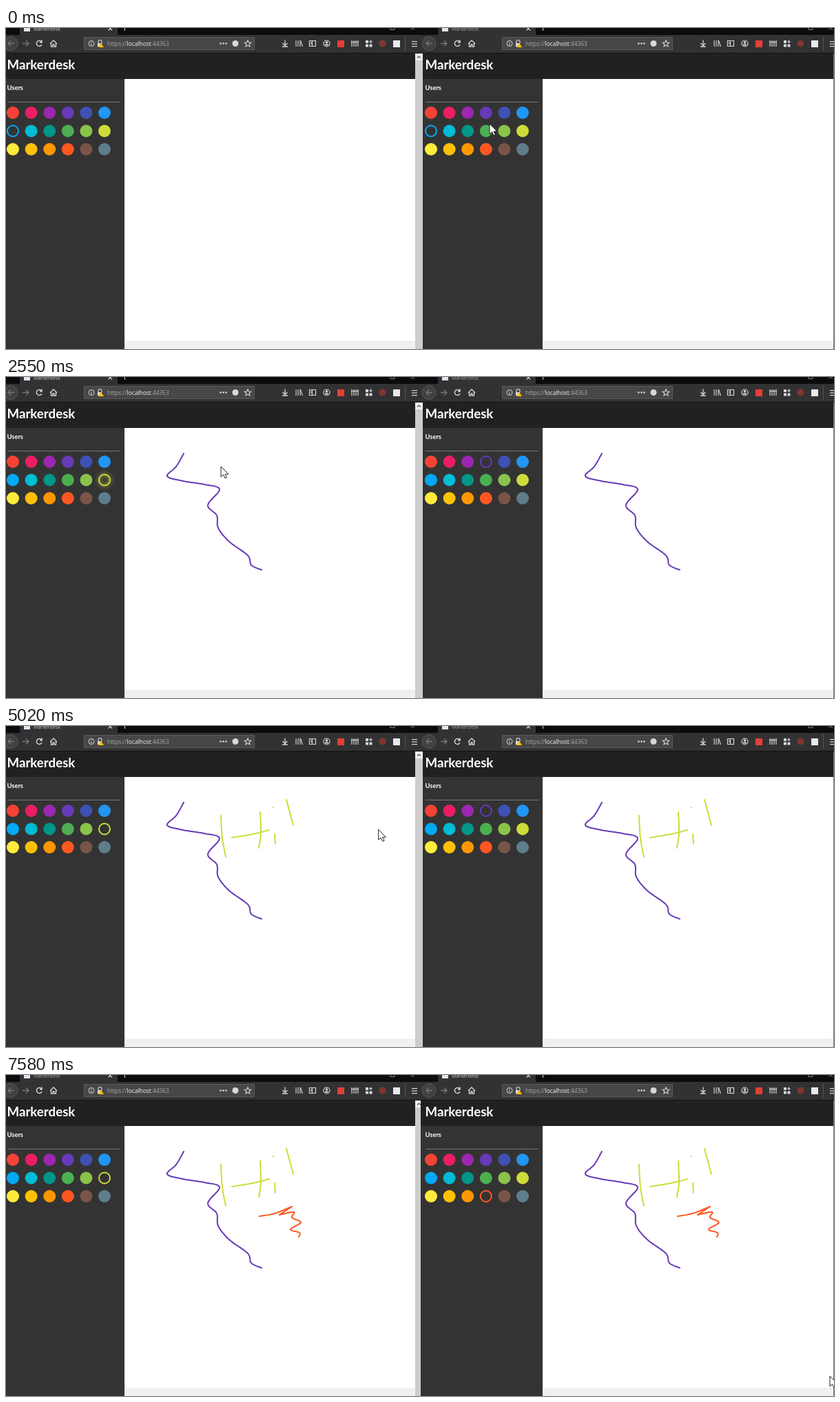
Recreate the animation shown at these times as an HTML page with a canvas. Size 1202x466 px, loop 7.65 s.

```html
<!DOCTYPE html>
<html lang="en">
<head>
<meta charset="utf-8">
<title>Shared drawing</title>
<style>
html, body { margin: 0; width: 100%; height: 100%; overflow: hidden; background: #333; }
canvas { display: block; }
</style>
</head>
<body>
<canvas id="stage" width="1202" height="466"></canvas>
<script>
const g = document.getElementById('stage').getContext('2d');
const LOOP = 7650, STEP = LOOP / 99, SHIFT = 607, TAU = Math.PI * 2;
const NAME = 'Markerdesk';
const UI = '"Open Sans", "Noto Sans", sans-serif', LATO = 'Lato, sans-serif';
const INK = '#d8d8da', DIM = '#78787b', BAR = '#323234';
const SWATCHES = ('f44336 e91e63 9c27b0 673ab7 3f51b5 2196f3 03a9f4 00bcd4 009688 ' +
  '4caf50 8bc34a cddc39 ffeb3b ffc107 ff9800 ff5722 795548 607d8b').split(' ').map(c => '#' + c);
const PURPLE = 3, SKY = 6, LIME = 11, ORANGE = 15;

const clamp = v => Math.max(0, Math.min(1, v));
const mix = (a, b, k) => a + (b - a) * k;
const during = (t, a, b) => t >= a && t < b;

// Catmull-Rom curve through the given points.
function smooth(pts) {
  const at = i => pts[Math.max(0, Math.min(pts.length - 1, i))];
  const out = [pts[0]];
  for (let i = 0; i < pts.length - 1; i++) {
    for (let n = 1; n <= 8; n++) {
      const k = n / 8;
      out.push([0, 1].map(c => {
        const [a, b, d, e] = [-1, 0, 1, 2].map(j => at(i + j)[c]);
        return b + k / 2 * (d - a + k * (2 * a - 5 * b + 4 * d - e + k * (3 * (b - d) + e - a)));
      }));
    }
  }
  return out;
}

// Part of a polyline up to a share of its length.
function trim(pts, share) {
  const lens = pts.slice(1).map((p, i) => Math.hypot(p[0] - pts[i][0], p[1] - pts[i][1]));
  let left = share * lens.reduce((a, b) => a + b, 0);
  const out = [pts[0]];
  for (let i = 0; i < lens.length && left > 0; i++) {
    const k = Math.min(1, left / lens[i]);
    out.push([mix(pts[i][0], pts[i + 1][0], k), mix(pts[i][1], pts[i + 1][1], k)]);
    left -= lens[i];
  }
  return out;
}

// Pointer stops: time, x, y. Stroke ends are added by pen().
const stops = [
  [0, 702, 139], [155, 699, 125], [320, 699, 125], [600, 865, 111], [1560, 978, 280],
  [2220, 143, 151], [2410, 143, 151], [3170, 367, 177], [3900, 382, 151], [5022, 593, 153],
  [5330, 697, 180], [5570, 697, 180], [6180, 966, 168], [7573, 1196, 437], [LOOP, 1196, 437]
];
const strokes = [];

function pen(ink, from, to, ...pts) {
  const side = ink === LIME ? 0 : 1;
  const stop = (t, [x, y]) => stops.push([t, x + side * SHIFT, y]);
  if (!strokes.some(s => s.to === from)) stop(from - 28, pts[0]);
  stop(from, pts[0]);
  stop(to, pts[pts.length - 1]);
  strokes.push({ ink, side, from, to, pts: smooth(pts) });
}

pen(PURPLE, 690, 1390, [258, 111], [247, 130], [234, 144], [257, 151], [288, 156], [310, 163],
  [293, 186], [306, 201], [308, 219], [324, 239], [351, 259], [356, 273], [371, 280]);
pen(LIME, 2570, 2740, [312, 130], [314, 163], [319, 190]);
pen(LIME, 2870, 3060, [369, 125], [370, 155], [367, 177]);
pen(LIME, 3430, 3800, [328, 162], [358, 157], [382, 151]);
pen(LIME, 4020, 4150, [390, 157], [391, 171]);
pen(LIME, 4320, 4400, [388, 118], [388, 118.5]);
pen(LIME, 4630, 4810, [407, 107], [417, 144]);
pen(ORANGE, 6290, 6430, [368, 205], [390, 201], [415, 191]);
pen(ORANGE, 6430, 6491, [415, 191], [397, 203]);
pen(ORANGE, 6491, 7090, [397, 203], [418, 199], [415, 207], [428, 214], [413, 224], [426, 229], [425, 235]);
stops.sort((a, b) => a[0] - b[0]);

const clicks = [[230, 305], [2290, 2390], [5480, 5555]];

function pointer(t) {
  const s = strokes.find(s => during(t, s.from, s.to));
  if (s) {
    const [x, y] = trim(s.pts, (t - s.from) / (s.to - s.from)).pop();
    return { x: x + s.side * SHIFT, y, down: true };
  }
  let i = 0;
  while (i < stops.length - 2 && stops[i + 1][0] <= t) i++;
  const [a, b] = [stops[i], stops[i + 1]];
  let k = clamp((t - a[0]) / (b[0] - a[0]));
  k = k * k * (3 - 2 * k);
  return { x: mix(a[1], b[1], k), y: mix(a[2], b[2], k), down: clicks.some(c => during(t, ...c)) };
}

function box(x, y, w, h, color) { g.fillStyle = color; g.fillRect(x, y, w, h); }
function dot(x, y, r, color) { g.fillStyle = color; g.beginPath(); g.arc(x, y, r, 0, TAU); g.fill(); }
function ring(x, y, r, color, w = 1.2) {
  g.strokeStyle = color; g.lineWidth = w;
  g.beginPath(); g.arc(x, y, r, 0, TAU); g.stroke();
}
function path(d, color, w = 1.3) {
  g.strokeStyle = color; g.lineWidth = w; g.stroke(new Path2D(d));
}
function text(s, x, y, font, color) {
  g.font = font; g.fillStyle = color; g.fillText(s, x, y);
  return x + g.measureText(s).width;
}

function tabs(active) {
  box(0, 0, 607, 11, '#0c0c0d');
  box(20, 0, 142, 11, BAR);
  box(0, 10, 607, 26, BAR);
  box(0, 36, 607, 1, '#121213');
  box(26, 0, 9, 5, '#dce8ee');
  text(NAME, 40, 3.6, '7.1px ' + UI, active ? '#c9c9cb' : '#a2a2a4');
  path('M148.5 -2l5.5 5.5m0 -5.5l-5.5 5.5', INK, 1.2);
  box(172, 0, 1, 4, INK);
  path('M558 -3v5.5h6v-5.5M587.5 -3l5.5 6m0 -6l-5.5 6', '#858587', 1);
}

function navigation() {
  dot(7, 22.5, 10, '#414143');
  ring(7, 22.5, 10, '#59595b', 1);
  path('M12 22.5h-9m4 -4l-4 4l4 4', DIM);
  path('M24 22.5h9m-4 -4l4 4l-4 4', DIM);
  path('M51.5 20a4 4 0 1 0 .5 4m0 -6.5v3.5h-3', INK, 1.4);
  path('M64 23l5 -5l5 5m-8.500 -1v5h2.500v-3h2v3h2.500v-5', INK);
}

function address() {
  box(113, 13, 248, 19, '#5a5a5c');
  box(114, 14, 246, 17, '#474749');
  ring(124, 22.5, 4, INK, 1);
  box(123.5, 22, 1, 3, INK);
  box(123.5, 20, 1, 1, INK);
  path('M134 22v-2a2.5 2.5 0 0 1 5 0v2', INK, 1.1);
  box(133, 22, 6, 5, INK);
  g.fillStyle = '#ffbf00';
  g.fill(new Path2D('M138 21.5l4 6.5h-8z'));
  const font = '8.4px ' + UI;
  let x = text('https://', 147, 26, font, '#a9a9ab');
  x = text('localhost', x, 26, font, '#f4f4f5');
  text(':44363', x, 26, font, '#a9a9ab');
  for (let i = 0; i < 3; i++) dot(311.5 + i * 4, 22.5, 1.35, INK);
  dot(333, 22.5, 4.5, INK);
  g.strokeStyle = INK;
  g.lineWidth = 1.1;
  g.beginPath();
  for (let i = 0; i < 10; i++) {
    const r = i % 2 ? 2.3 : 5, a = i * TAU / 10;
    g.lineTo(351 + r * Math.sin(a), 22.8 - r * Math.cos(a));
  }
  g.closePath();
  g.stroke();
}

function extras() {
  path('M405 17.5v7.5m-3.5 -3l3.5 3.5l3.5 -3.5m-7.5 5h8', INK);
  for (let i = 0; i < 3; i++) box(420.5 + i * 3, 18, 1.1, 9, INK);
  path('M427.5 18l3 9', INK, 1.1);
  path('M440.5 18.5h9v8h-9zm4 0v8m-2.5 -5.5h2m-2 2h2', INK, 1.2);
  ring(465.5, 22.5, 4.5, INK);
  dot(465.5, 21, 1.8, INK);
  box(463, 23.5, 5, 2, INK);
  box(481, 18, 10, 10, '#e53e35');
  for (let i = 0; i < 4; i++) box(501.4 + i * 3, 18, 1.2, 9, INK);
  box(501, 20, 11, 1, INK);
  box(522, 18, 4, 4, INK);
  box(522, 23.5, 4, 4, INK);
  box(527.5, 23.5, 4, 4, INK);
  path('M529.5 17.5v4.5m-2.3 -2.2h4.6', INK, 1.2);
  dot(546.5, 22.5, 5, '#80372e');
  box(562, 18, 10, 10, '#e9e9e9');
  box(579, 12, 1, 21, '#555557');
  for (let i = 0; i < 3; i++) box(589, 19 + i * 3.5, 8, 1.2, INK);
}

function swatches(chosen, glow, mx, my) {
  SWATCHES.forEach((color, i) => {
    const x = 10 + (i % 6) * 26.6, y = 123 + Math.floor(i / 6) * 26.5;
    const grow = Math.hypot(mx - x, my - y) < 11.5 ? 1.2 : 1;
    if (i !== chosen) return dot(x, y, 9 * grow, color);
    g.save();
    if (glow) { g.shadowColor = color; g.shadowBlur = 6; }
    ring(x, y, 8 * grow, color, 2);
    g.restore();
  });
}

function drawing(side, t) {
  g.save();
  g.lineCap = g.lineJoin = 'round';
  g.lineWidth = 2;
  for (const s of strokes) {
    const lag = s.side === side ? 30 : 50;
    const k = clamp((t - lag - s.from) / (s.to - s.from));
    if (k <= 0) continue;
    g.strokeStyle = SWATCHES[s.ink];
    g.beginPath();
    trim(s.pts, k).forEach(p => g.lineTo(...p));
    g.stroke();
  }
  g.restore();
}

function browser(side, t, active, p) {
  const edge = side && active ? -5 : side ? -2 : 0;
  g.save();
  g.translate(side * SHIFT, 0);
  box(edge, 0, 8, 11, '#0c0c0d');
  box(edge, 10, 8, 26, BAR);
  tabs(active);
  navigation();
  address();
  extras();
  box(edge, 37, 612, 37, '#212121');
  box(edge, 74, 180, 392, '#333');
  box(172, 74, 422, 380, '#fff');
  box(172, 454, 422, 12, '#f0f0f0');
  text(NAME, 1.5, 60, 'bold 18.7px ' + LATO, '#fff');
  text('Users', 1.5, 89.5, 'bold 9.4px ' + LATO, '#fff');
  box(2, 107, 164, 1, '#777');

  const chosen = side ? (t < 305 ? SKY : t < 5555 ? PURPLE : ORANGE) : (t < 2390 ? SKY : LIME);
  const glow = side ? during(t, 305, 690) || during(t, 5555, 6290) : during(t, 2390, 2570);
  swatches(chosen, glow, p.x - side * SHIFT, p.y);
  drawing(side, t);

  if (side) box(594, 37, 1, 429, '#777');
  else {
    box(594, 37, 11, 429, '#cdcdcd');
    box(594, 37, 11, 10, '#f0f0f0');
    path('M597 43.5l2.5 -2.5l2.5 2.5', '#555', 1.2);
  }
  g.restore();
}

const arrow = new Path2D('M0 0v15l3.5 -3.2l2.5 5.2l2.4 -1l-2.4 -5h4.8z');

function render(t) {
  const p = pointer(t);
  const right = during(t, 230, 2290) || t >= 5480;
  browser(0, t, !right, p);
  browser(1, t, right, p);
  if (p.down) dot(p.x, p.y, 11.5, 'rgba(255,255,0,.52)');
  g.save();
  g.translate(p.x, p.y);
  g.fillStyle = '#fff';
  g.fill(arrow);
  g.strokeStyle = '#222';
  g.lineWidth = 1;
  g.stroke(arrow);
  g.restore();
}

const begin = performance.now();
function tick() {
  const t = (performance.now() - begin) % LOOP;
  render(Math.floor(t / STEP) * STEP);
  requestAnimationFrame(tick);
}
tick();
</script>
</body>
</html>
```
